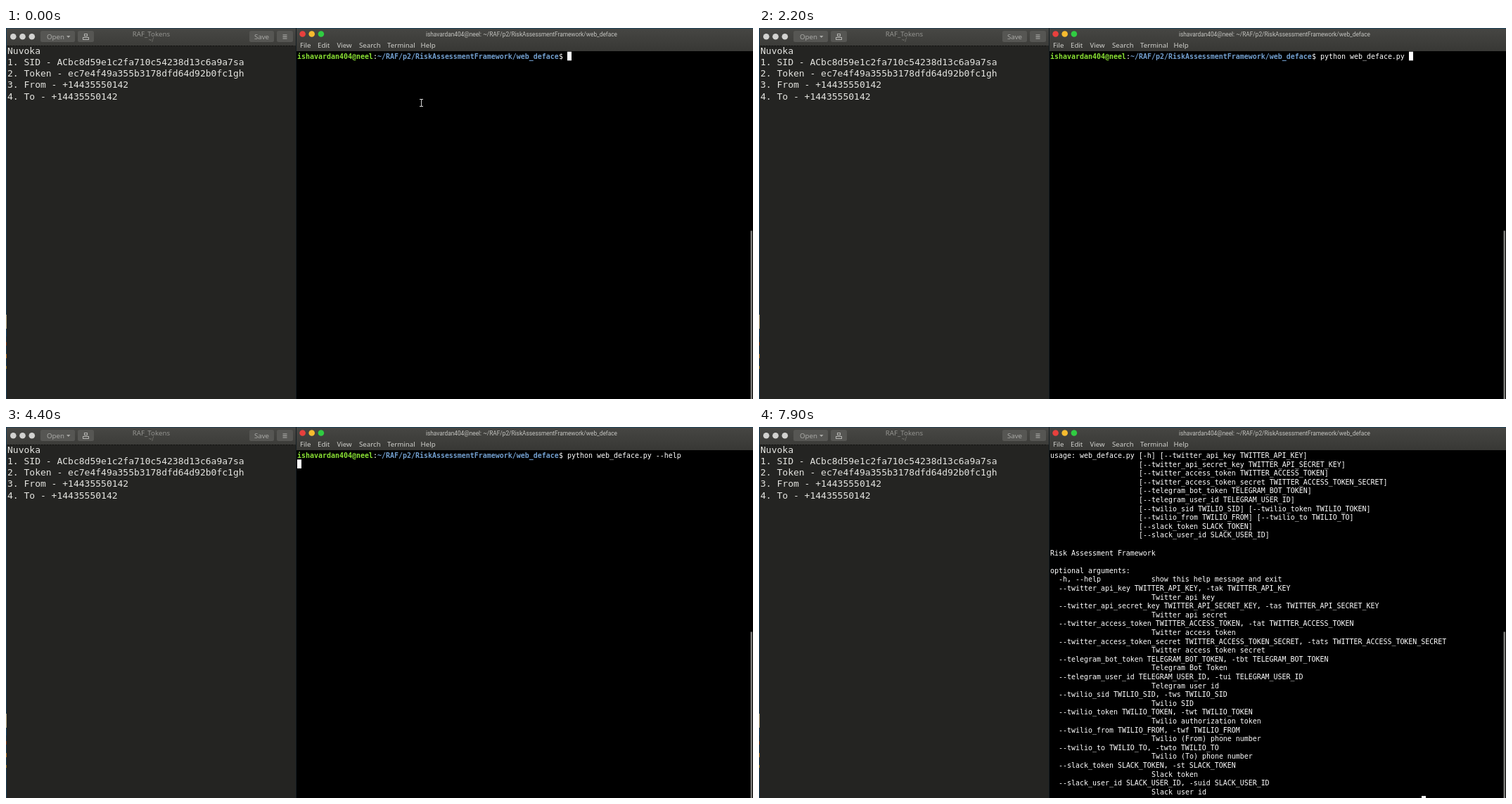
An HTML page with a canvas that plays this animation: 1062x528 px, repeating every 8000 ms.

```html
<!DOCTYPE html>
<html lang="en">
<head>
<meta charset="utf-8">
<title>Terminal session</title>
<style>
html, body { margin: 0; width: 100%; height: 100%; overflow: hidden; background: #000; }
canvas { display: block; }
</style>
</head>
<body>
<canvas id="stage" width="1062" height="528"></canvas>
<script>
const W = 1062, H = 528, LOOP = 8000;
const ctx = document.getElementById('stage').getContext('2d');

const MONO = '"DejaVu Sans Mono", monospace';
const SANS = '"Noto Sans", sans-serif';
const TERM = '9.966px ' + MONO;
const LABEL = '9.7px ' + SANS;
const CELL = 6, ROW = 12.6, LEFT = 414, TOP = 33.7;

const USER = 'ishavardan404@neel';
const PATH = '~/RAF/p2/RiskAssessmentFramework/web_deface';
const COMMAND = 'python web_deface.py --help';
const START = 64; // first column after the prompt

const NOTES = [
  'Nuvoka',
  '1. SID - ACbc8d59e1c2fa710c54238d13c6a9a7sa',
  '2. Token - ec7e4f49a355b3178dfd64d92b0fc1gh',
  '3. From - +14435550142',
  '4. To - +14435550142'
];

// [time, typed characters, cursor visible]
const TYPING = [
  [0, 0, 1], [100, 0, 0], [400, 0, 1], [700, 2, 1], [900, 3, 1], [1000, 4, 1],
  [1100, 5, 1], [1300, 6, 1], [1600, 7, 1], [1800, 8, 1], [1900, 9, 1],
  [2000, 10, 1], [2200, 21, 1], [2700, 21, 0], [2900, 21, 1], [3100, 23, 1],
  [3300, 24, 1], [3400, 25, 1], [3600, 26, 1], [3800, 27, 1], [4100, 27, 0]
];
const RECALL = [
  [4500, 0, 1], [4700, 0, 0], [5300, 0, 1], [5900, 0, 0], [6500, 0, 1],
  [7000, 27, 1], [7500, 26, 1], [7600, 25, 1], [7900, 24, 1]
];

// [option, short flag, description]
const OPTIONS = [
  ['twitter_api_key', 'tak', 'Twitter api key'],
  ['twitter_api_secret_key', 'tas', 'Twitter api secret'],
  ['twitter_access_token', 'tat', 'Twitter access token'],
  ['twitter_access_token_secret', 'tats', 'Twitter access token secret'],
  ['telegram_bot_token', 'tbt', 'Telegram Bot Token'],
  ['telegram_user_id', 'tui', 'Telegram user id'],
  ['twilio_sid', 'tws', 'Twilio SID'],
  ['twilio_token', 'twt', 'Twilio authorization token'],
  ['twilio_from', 'twf', 'Twilio (From) phone number'],
  ['twilio_to', 'twto', 'Twilio (To) phone number'],
  ['slack_token', 'st', 'Slack token'],
  ['slack_user_id', 'suid', 'Slack user id']
];
const HELP = helpLines();

function helpLines() {
  const usage = OPTIONS.map(([name]) => `[--${name} ${name.toUpperCase()}]`);
  const pad = ' '.repeat(21);
  const lines = [
    'usage: web_deface.py [-h] ' + usage[0],
    ...usage.slice(1, 6).map(u => pad + u),
    pad + usage[6] + ' ' + usage[7],
    pad + usage[8] + ' ' + usage[9],
    pad + usage[10],
    pad + usage[11],
    '', 'Risk Assessment Framework', '', 'optional arguments:',
    '  -h, --help'.padEnd(24) + 'show this help message and exit'
  ];
  for (const [name, flag, text] of OPTIONS) {
    const meta = name.toUpperCase();
    lines.push(`  --${name} ${meta}, -${flag} ${meta}`, ' '.repeat(24) + text);
  }
  return lines;
}

function rect(x, y, w, h, color) {
  ctx.fillStyle = color;
  ctx.fillRect(x, y, w, h);
}

function shade(x, y, w, h, from, to) {
  const g = ctx.createLinearGradient(0, y, 0, y + h);
  g.addColorStop(0, from);
  g.addColorStop(1, to);
  rect(x, y, w, h, g);
}

function dot(x, y, r, color) {
  ctx.fillStyle = color;
  ctx.beginPath();
  ctx.arc(x, y, r, 0, Math.PI * 2);
  ctx.fill();
}

function button(x, y, w, h) {
  ctx.fillStyle = '#565653';
  ctx.beginPath();
  ctx.roundRect(x, y, w, h, 2.5);
  ctx.fill();
}

function text(str, x, y, font, color, align = 'left') {
  ctx.font = font;
  ctx.fillStyle = color;
  ctx.textAlign = align;
  ctx.fillText(str, x, y);
}

function termText(str, col, row, color = '#fff', weight = '') {
  const body = str.trimStart();
  const x = LEFT + (col + str.length - body.length) * CELL;
  text(body, x, Math.round(TOP + row * ROW + 10.3), weight + TERM, color);
}

function cursor(col, row) {
  rect(LEFT + col * CELL, TOP + row * ROW, CELL, ROW, '#fff');
}

function drawEditor() {
  rect(0, 0, 413, H, '#242422');
  shade(0, 0, 412, 25, '#484845', '#3c3c39');
  rect(0, 0, 412, 1, '#26404f');
  for (let x = 2; x < 410; x += 4) rect(x, 25, 2, 1, '#11110f');

  for (const x of [10.3, 23.5, 36.8]) dot(x, 12.3, 4.3, '#d2d2d0');
  button(49, 4, 49, 16);
  button(102, 4, 23, 16);
  button(346, 4, 35, 16);
  button(385, 4, 23, 16);
  text('Open', 58, 16, LABEL, '#a9a9a6');
  text('Save', 363.5, 16, LABEL, '#a9a9a6', 'center');
  text('RAF_Tokens', 206.5, 11.5, LABEL, '#93938f', 'center');
  text('~/', 206.5, 20, '8px ' + SANS, '#7c7c78', 'center');

  ctx.fillStyle = '#a9a9a6';
  ctx.beginPath();
  ctx.moveTo(86, 11);
  ctx.lineTo(91.5, 11);
  ctx.lineTo(88.75, 14);
  ctx.fill();
  for (const y of [9.5, 12, 14.5]) rect(393.5, y, 6, 1, '#b4b4b1');

  ctx.strokeStyle = '#b4b4b1';
  ctx.lineWidth = 1;
  ctx.strokeRect(109.5, 13.5, 8, 3);
  ctx.strokeRect(111.5, 8.5, 4, 3);
  rect(111, 11, 5, 1, '#b4b4b1');

  NOTES.forEach((line, i) => text(line, 2, Math.round(36.8 + i * 16.2), '13px ' + MONO, '#e4e4e0'));

  rect(0, 0, 1, H, '#183c54');
  rect(0, 408, 1, 20, '#b5ad8c');
  rect(0, 430, 1, 9, '#16466b');
  rect(0, 447, 1, 5, '#7a3a1c');
  rect(0, 464, 1, 6, '#b0762c');
  rect(0, 481, 1, 4, '#9a7a2a');
}

function drawTerminal() {
  rect(412, 0, W - 412, H, '#000');
  rect(412, 0, 1, H, '#141d22');
  shade(413, 0, W - 413, 33, '#464643', '#383835');
  rect(413, 0, W - 413, 1, '#1d4257');
  dot(421.6, 8.5, 4.3, '#e8403d');
  dot(434.7, 8.5, 4.3, '#f6bb2f');
  dot(447.9, 8.5, 4.3, '#30cc42');
  text(`${USER}: ${PATH}`, 869, 12, '8.3px Roboto, sans-serif', '#c4c4c0', 'right');

  const menu = [['File', 418], ['Edit', 443], ['View', 470.5], ['Search', 502], ['Terminal', 542], ['Help', 589.5]];
  for (const [name, x] of menu) text(name, x, 28, LABEL, '#d0d0cc');
}

function drawPrompt(typed) {
  termText(USER, 0, 0, '#8ae234', 'bold ');
  termText(':', 18, 0);
  termText(PATH, 19, 0, '#729fcf', 'bold ');
  termText('$', 62, 0);
  termText(COMMAND.slice(0, typed), START, 0);
}

function drawPointer(x, y) {
  ctx.strokeStyle = '#d8d8d8';
  ctx.lineWidth = 1;
  ctx.beginPath();
  ctx.moveTo(x - 2.5, y - 5);
  ctx.lineTo(x + 2.5, y - 5);
  ctx.moveTo(x, y - 5);
  ctx.lineTo(x, y + 5);
  ctx.moveTo(x - 2.5, y + 5);
  ctx.lineTo(x + 2.5, y + 5);
  ctx.stroke();
}

function draw(t) {
  const steps = t < 4500 ? TYPING : RECALL;
  const [, typed, visible] = steps.findLast(s => s[0] <= t);

  drawEditor();
  drawTerminal();
  if (t < 4500) {
    drawPrompt(typed);
    if (visible) cursor(START + typed, 0);
    if (t >= 4100) cursor(0, 1);
    if (t < 400) drawPointer(590.5, 106.5);
  } else {
    HELP.forEach((line, row) => termText(line, 0, row));
    if (visible) cursor(START + typed, HELP.length);
  }
  const thumb = t < 4400 ? 288.5 : 291.5;
  rect(1058.5, thumb, 2.5, H - thumb, '#7d7d7a');
}

function tick(now) {
  draw(now % LOOP);
  requestAnimationFrame(tick);
}
requestAnimationFrame(tick);
</script>
</body>
</html>
```
